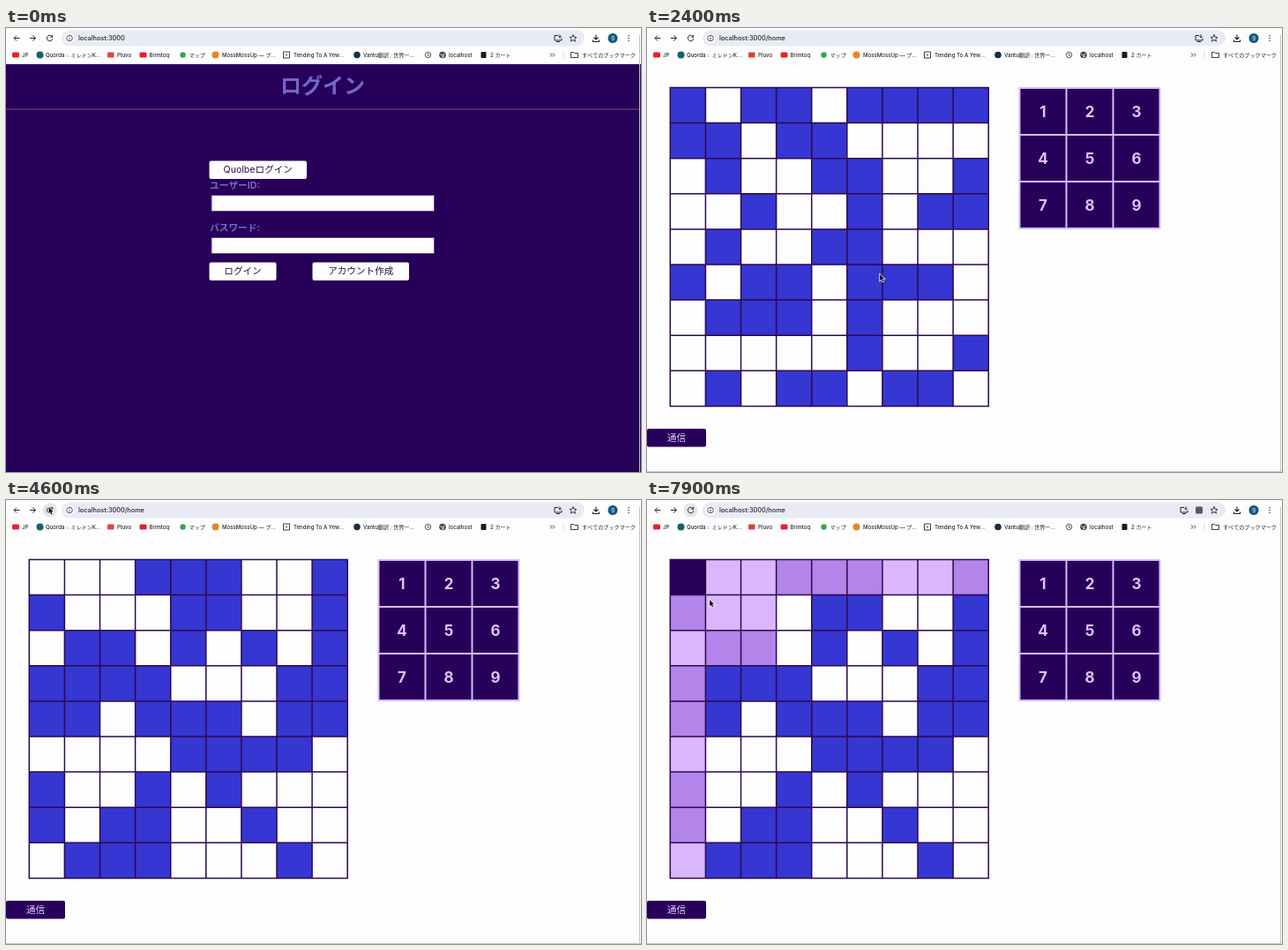
Recreate the animation shown at these times as an HTML page with a canvas. Size 720 by 503 pixels, loop 8 s.

```html
<!DOCTYPE html>
<html lang="ja">
<head>
<meta charset="utf-8">
<style>
html, body { margin: 0; width: 100%; height: 100%; overflow: hidden; background: #fdfdfe; }
canvas { display: block; }
</style>
</head>
<body>
<canvas id="stage" width="720" height="503"></canvas>
<script>
const ctx = document.getElementById('stage').getContext('2d');
const LOOP = 8000;
const FONT = "Inter, 'Noto Sans CJK JP', 'Noto Sans CJK', sans-serif";
const INK = '#26272a', PAPER = '#fdfdfe', PURPLE = '#270059', BLUE = '#3636d2';
const LILAC = '#dab6fc', VIOLET = '#b384ea', LINE = '#2b0850', TITLE = '#7268c8', EDGE = '#c4c4c6';

const BOARDS = [
  [1600, '#.##.#### ##.##.... .#..##..# ..#..#.## .#..##... #.##.###. .###.#... .....#..# .#.##.##.'],
  [3400, '.#.#...## .#####.## ###...### .####.... #.#.##... #..#.##.# .####.##. ..#.....# ....##...'],
  [4500, '...###..# #...##..# .##.#.#.# ####...## ##.###.## ....####. #..#.#... #.##..#.. .###...#.'],
].map(([start, rows]) => ({ start, rows: rows.split(' ') }));

const TIMES = { hover: 900, home: 1600, reloadHover: 3000, popup: 4900, popupEnd: 5400, select: 6500 };
const CURSOR = [
  [100, 300, 120], [900, 264, 264], [1000, 264, 264], [1200, 264, 279], [2400, 264, 279],
  [3000, 48.5, 8], [5700, 48.5, 8], [5900, 129, 95], [6200, 129, 95], [6500, 51, 75],
  [7400, 51, 75], [7900, 71, 113],
];

function text(str, x, y, size, color = INK, weight = 500, align = 'left') {
  ctx.font = `${weight} ${size}px ${FONT}`;
  ctx.fillStyle = color;
  ctx.textAlign = align;
  ctx.textBaseline = 'middle';
  ctx.fillText(str, x, y);
}
function box(x, y, w, h, fill, radius = 0, border) {
  ctx.beginPath();
  ctx.roundRect(x, y, w, h, radius);
  ctx.fillStyle = fill;
  ctx.fill();
  if (border) { ctx.strokeStyle = border; ctx.lineWidth = 1; ctx.stroke(); }
}
function dot(x, y, r, fill) {
  ctx.beginPath();
  ctx.arc(x, y, r, 0, 7);
  ctx.fillStyle = fill;
  ctx.fill();
}
function icon(x, y, path, color = INK, width = 1) {
  ctx.save();
  ctx.translate(x, y);
  ctx.strokeStyle = color;
  ctx.lineWidth = width;
  ctx.lineJoin = 'round';
  ctx.stroke(new Path2D(path));
  ctx.restore();
}
const ring = r => `M${r} 0A${r} ${r} 0 1 1 ${-r} 0A${r} ${r} 0 1 1 ${r} 0`;
const menuDots = (x, y, gap) => [-gap, 0, gap].forEach(d => dot(x, y + d, 0.75, INK));

function bookmarks() {
  const y = 30.5;
  const label = (str, x) => text(str, x, y + 0.3, 6.1);
  box(7, 27.5, 8, 6, '#e8202a', 1.5);
  label('JP', 18);
  dot(38.5, y, 4, '#17616b');
  label('Quorda :: ミレドンK...', 45);
  box(115, 27.5, 7.5, 6, '#dc4437', 1);
  label('Pluvo', 126);
  box(151.5, 27.5, 8, 6, '#e8202a', 1.5);
  label('Brimtoq', 162.5);
  dot(200.5, y, 3.2, '#35a553');
  label('マップ', 207.5);
  dot(237.5, y, 4, '#e98427');
  label('MossMossUp — プ...', 245);
  icon(318, y, 'M-3.5-3.5h7v7h-7zM-1 0h2', INK, 0.9);
  label('Tending To A Yew...', 326);
  dot(398, y, 3.8, '#17304a');
  label('Vantu翻訳 : 世界一...', 405);
  icon(478.5, y, ring(3.2) + 'M0-2V.3L1.5 1.2', INK, 0.8);
  dot(495, y, 3.8, '#45494d');
  icon(495, y, 'M-2.5-1L0 1L2-2M-1 3L2 1', PAPER, 0.9);
  label('localhost', 502);
  box(538.5, 27, 6, 7, '#1c1c1c', 1);
  label('2 カート', 549);
  icon(619, y, 'M-2-2L0 0L-2 2M1-2L3 0L1 2', INK, 0.9);
  icon(632, y, 'M0-4V4', '#d0d3da', 0.8);
  icon(644.5, y, 'M-4-3h3l1 1h4v5h-8z', INK, 0.9);
  label('すべてのブックマーク', 653);
}

function toolbar(t) {
  box(0, 0, 720, 41, PAPER);
  icon(12, 11.5, 'M3.5 0H-3M0-3L-3 0L0 3');
  icon(30.5, 11.5, 'M-3.5 0H3M0-3L3 0L0 3');
  if (t >= TIMES.reloadHover) dot(49.5, 11.5, 8, '#e3e5ea');
  icon(49.5, 11.5, 'M2.4-2.1A3.2 3.2 0 1 0 3.2.6M3.2-3.6V-1.2H.8');
  box(63, 2.5, 593, 18, '#e8ebf3', 9);
  dot(72, 11.5, 5.5, PAPER);
  icon(72, 11.5, ring(3.3) + 'M0-.5V2M0-2V-1.2', INK, 0.8);
  text(t < TIMES.home ? 'localhost:3000' : 'localhost:3000/home', 82, 11.8, 7.3);
  const translating = t >= TIMES.popup;
  icon(translating ? 609 : 626, 11.5, 'M0-3H-4V2.5H4V0M-2 4H2M2-4V-.5M.5-2L2-.5L3.5-2');
  if (translating) {
    if (t < TIMES.popupEnd) dot(626, 11.5, 7, '#cdd0d8');
    box(622, 7.5, 8, 8, '#55595e', 1.5);
  }
  icon(643, 11.5, 'M0-4L1.1-1.2L4-1L1.8.9L2.5 3.7L0 2.1L-2.5 3.7L-1.8.9L-4-1L-1.1-1.2Z', INK, 0.9);
  icon(669, 11.5, 'M0-4V1.5M-2.5-1L0 1.5L2.5-1M-3.5 2V4H3.5V2', INK, 1.1);
  dot(688, 11.5, 5.5, '#125682');
  text('g', 688, 11.2, 6, '#d8e6f0', 500, 'center');
  menuDots(706, 11.5, 2.8);
  bookmarks();
}

function button(label, x, y, w, fill = PAPER, color = '#2c1245') {
  box(x, y, w, 20.5, fill, 2);
  text(label, x + w / 2, y + 10.5, 10.6, color, 400, 'center');
}

function loginPage(t) {
  box(0, 41, 720, 462, PURPLE);
  text('ログイン', 359, 67, 24, TITLE, 700, 'center');
  box(0, 91.5, 718, 1, '#655274');
  button('Quolbeログイン', 230.5, 150.5, 110.5);
  text('ユーザーID:', 231, 179, 10.7, TITLE, 700);
  text('パスワード:', 231, 226.5, 10.7, TITLE, 700);
  for (const y of [189.5, 237.5]) box(233, y, 252.5, 18, PAPER, 0, '#5d477a');
  const hovered = t >= TIMES.hover;
  button('ログイン', 230.5, 265.5, 76, hovered ? '#d0aef6' : PAPER, hovered ? '#fbf1f6' : undefined);
  button('アカウント作成', 347.5, 265.5, 109.5);
}

function cellColor(filled, row, col, selected) {
  if (selected) {
    if (row + col === 0) return PURPLE;
    if (row === 0 || col === 0 || (row < 3 && col < 3)) return filled ? VIOLET : LILAC;
  }
  return filled ? BLUE : PAPER;
}

function grid(x0, y0, count, size, color, width) {
  ctx.strokeStyle = color;
  ctx.lineWidth = width;
  ctx.beginPath();
  for (let i = 0; i <= count; i++) {
    const d = i * size, end = count * size, cap = width / 2;
    ctx.moveTo(x0 + d, y0 - cap);
    ctx.lineTo(x0 + d, y0 + end + cap);
    ctx.moveTo(x0 - cap, y0 + d);
    ctx.lineTo(x0 + end + cap, y0 + d);
  }
  ctx.stroke();
}

function homePage(t) {
  box(0, 41, 720, 462, PAPER);
  const size = 40.1, left = 26.3, top = 67.5;
  const { rows } = BOARDS.findLast(b => t >= b.start);
  rows.forEach((row, r) => [...row].forEach((c, i) =>
    box(left + i * size, top + r * size, size, size, cellColor(c === '#', r, i, t >= TIMES.select))));
  grid(left, top, 9, size, LINE, 1.5);

  box(422, 67.5, 160, 160, PURPLE);
  grid(422.5, 68, 3, 53, '#d6bbf7', 2);
  for (let n = 0; n < 9; n++)
    text(n + 1, 449 + n % 3 * 53, 95.5 + Math.floor(n / 3) * 53, 17, '#dcc6f6', 700, 'center');
  button('通信', 0, 454, 67, PURPLE, '#e2cbf4');
  box(0, 502, 720, 1, EDGE);
}

function popup() {
  ctx.save();
  ctx.shadowColor = 'rgba(50, 50, 70, .35)';
  ctx.shadowBlur = 6;
  ctx.shadowOffsetY = 1;
  box(509, 20.5, 146.5, 45.5, PAPER, 4);
  ctx.restore();
  box(509, 42, 146.5, 24, '#eeeef2', [0, 0, 4, 4]);
  text('英語', 533, 32.5, 6.1, '#2867c8', 700, 'center');
  text('日本語', 569, 32.5, 6.1, INK, 700, 'center');
  box(517, 39.2, 32.5, 1.4, '#3a70d4');
  menuDots(622, 32.5, 2.6);
  icon(640, 32.5, 'M-2.5-2.5L2.5 2.5M2.5-2.5L-2.5 2.5', INK, 0.9);
  text('Quolbe', 519, 54.2, 6, '#484b50', 500);
  text('Translate', 541, 54.2, 5.8, '#64676b', 400);
}

function cursor(t) {
  if (t < CURSOR[0][0]) return;
  const next = CURSOR.findIndex(k => k[0] > t);
  const b = CURSOR.at(next), a = next < 0 ? b : CURSOR[next - 1];
  const p = b === a ? 1 : (t - a[0]) / (b[0] - a[0]);
  const ease = p * p * (3 - 2 * p);
  ctx.save();
  ctx.translate(a[1] + (b[1] - a[1]) * ease, a[2] + (b[2] - a[2]) * ease);
  const arrow = new Path2D('M0 0V7.2L1.6 5.7L2.8 8.5L4.1 7.9L2.9 5.2H5.2Z');
  ctx.strokeStyle = '#fff';
  ctx.lineWidth = 1.3;
  ctx.stroke(arrow);
  ctx.fillStyle = '#111';
  ctx.fill(arrow);
  ctx.restore();
}

function draw(now) {
  const t = now % LOOP;
  (t < TIMES.home ? loginPage : homePage)(t);
  toolbar(t);
  if (t >= TIMES.popup && t < TIMES.popupEnd) popup();
  box(718, 8, 1, 495, EDGE);
  cursor(t);
  requestAnimationFrame(draw);
}
requestAnimationFrame(draw);
</script>
</body>
</html>
```
